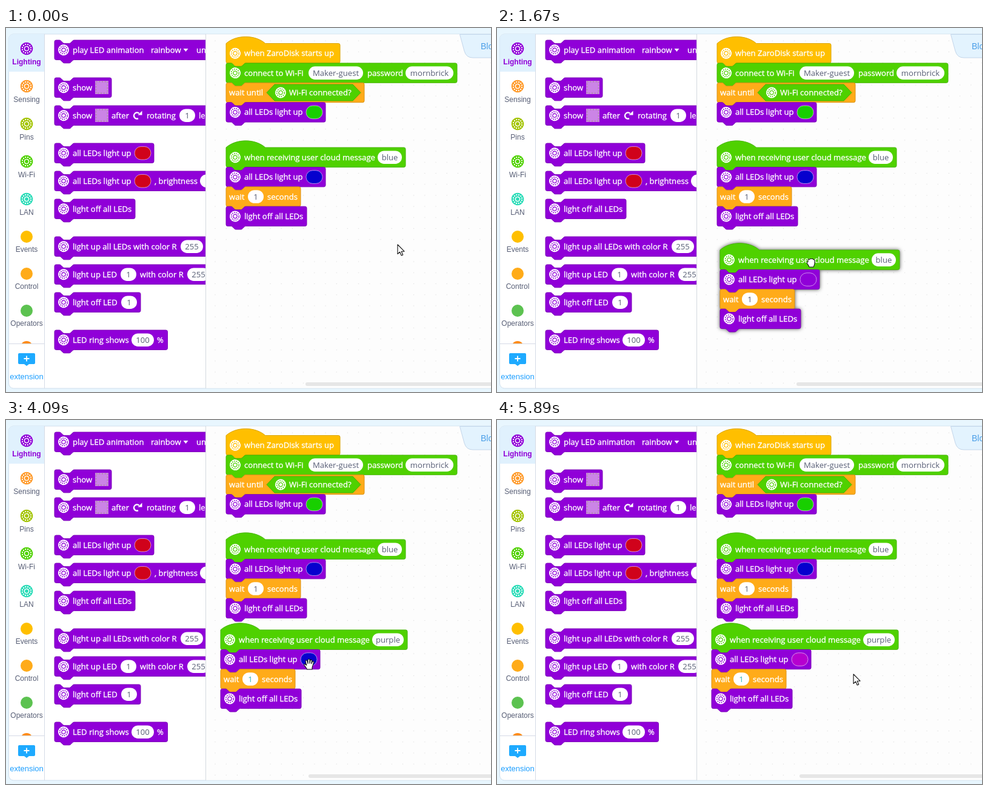
An HTML page that plays this animation: 800x600 px, repeating every 6360 ms.

```html
<!DOCTYPE html>
<html lang="en">
<head>
<meta charset="utf-8">
<title>Block editor</title>
<style>
html, body { margin: 0; width: 100%; height: 100%; overflow: hidden; background: #e8f6fe; }
svg { display: block; width: 800px; height: 600px; }
text { white-space: pre; }
.t { font: 13.1px "Open Sans", "Noto Sans", sans-serif; fill: #fff; stroke: #fff; stroke-width: .35px; }
.v { font: 13.1px "Open Sans", "Noto Sans", sans-serif; fill: #575e75; text-anchor: middle; }
.cat { font: 12px "Liberation Sans", Arial, sans-serif; fill: #575e75; text-anchor: middle; }
.on { font-weight: bold; fill: #9000d8; }
.lbl { font: bold 9.5px "Liberation Sans", Arial, sans-serif; letter-spacing: .45px; fill: #575e75; }
.num { font-weight: normal; }
.drag { filter: drop-shadow(0 0 3px rgba(0, 0, 0, .65)); }
.pop { filter: drop-shadow(0 0 4px rgba(0, 0, 0, .3)); }
</style>
</head>
<body>
<svg id="stage" viewBox="0 0 800 600"></svg>
<script>
const LOOP = 6360, SCALE = .675, ROW = 32.4, MID = 16.2;
const PURPLE = ['#9000d8', '#7a00b6'], GREEN = ['#4fd100', '#43b300'],
      GOLD = ['#ffbf00', '#d9a200'], ORANGE = ['#ffab19', '#d99116'];
const BLUE = '#0600ce', RED = '#d0021b';

// Block outline in unscaled units
function outline(width, hat) {
  const w = width / SCALE;
  const top = hat ? 'M0 0c25-22 71-22 96 0'
    : 'M0 4a4 4 0 0 1 4-4H12c2 0 3 1 4 2l4 4c1 1 2 2 4 2h12c2 0 3-1 4-2l4-4c1-1 2-2 4-2';
  return `${top}H${w - 4}a4 4 0 0 1 4 4V44a4 4 0 0 1-4 4H48c-2 0-3 1-4 2l-4 4c-1 1-2 2-4 2` +
    'h-12c-2 0-3-1-4-2l-4-4c-1-1-2-2-4-2H4a4 4 0 0 1-4-4z';
}

function halo(x, y, r, bg, fg) {
  const dot = 2 * Math.PI * r * .7 / 12;
  return `<g transform="translate(${x} ${y}) rotate(15)" fill="none" stroke="${fg}">
    <circle r="${r}" fill="${bg}" stroke="none"/>
    <circle r="${r * .7}" stroke-width="${r * .22}" stroke-linecap="round" stroke-dasharray="0 ${dot}"/>
    <circle r="${r * .35}" stroke-width="${r * .14}"/></g>`;
}

const txt = (x, s) => `<text class="t" x="${x}" y="20.8">${s}</text>`;
const icon = (c, x = 15) => halo(x, MID, 9, '#fff', c[0]);
const pill = (x, w, fill, extra = '') =>
  `<rect x="${x}" y="5.4" width="${w}" height="21.6" rx="10.8" fill="${fill}" ${extra}/>`;
const field = (x, w, s) => pill(x, w, '#fff') + `<text class="v" x="${x + w / 2}" y="20.8">${s}</text>`;
const led = (x, c, id = '') => pill(x, 27, c, `stroke="#fff" stroke-opacity=".55" ${id}`);
const matrix = x => `<rect x="${x}" y="5" width="22" height="22" fill="#cb84e6"/>
  <rect x="${x + 1.5}" y="6.5" width="19" height="19" fill="none" stroke="#b08aa8" stroke-width="2" stroke-dasharray="2 2.75"/>`;

function block(x, y, w, c, parts, hat, id = '') {
  return `<g transform="translate(${x} ${y})"><path ${id} d="${outline(w, hat)}" transform="scale(${SCALE})"
    fill="${c[0]}" stroke="${c[1]}" stroke-width="1.4"/>${parts}</g>`;
}
const ledBlock = (x, y, w, parts) => block(x, y, w, PURPLE, icon(PURPLE) + parts);

function palette() {
  const turn = `<path d="M138 21.1A5 5 0 1 1 139.5 12.9" fill="none" stroke="#fff" stroke-width="2.4"/>
    <path d="M137.5 15.5h7v-7z" fill="#fff"/>`;
  const rows = [
    [20, 330, txt(30, 'play LED animation') + txt(159, 'rainbow') + '<path d="M212.5 14h8l-4 5z" fill="#fff"/>' + txt(234, 'until done')],
    [82, 94, txt(30, 'show') + matrix(67)],
    [128, 330, txt(30, 'show') + matrix(67) + txt(94, 'after') + turn + txt(152, 'rotating') + field(206, 26, '1') + txt(238, 'leds')],
    [190, 164, txt(30, 'all LEDs light up') + led(132, RED)],
    [236, 330, txt(30, 'all LEDs light up') + led(132, RED) + txt(165, ', brightness') + field(240, 37, '')],
    [282, 133, txt(30, 'light off all LEDs')],
    [344, 330, txt(30, 'light up all LEDs with color R') + field(208, 37, '255')],
    [390, 330, txt(30, 'light up LED') + field(109, 26, '1') + txt(141, 'with color R') + field(219, 37, '255')],
    [436, 142, txt(30, 'light off LED') + field(110, 26, '1')],
    [498, 186.5, txt(30, 'LED ring shows') + field(127, 37, '100') + txt(169, '%')]
  ];
  return `<g clip-path="url(#palClip)">${rows.map(r => ledBlock(80, ...r)).join('')}</g>`;
}

function sidebar() {
  const cats = [['Lighting', '#9000d8'], ['Sensing', '#ff9a29'], ['Pins', '#a3c400'], ['Wi-Fi', '#4fd100'],
    ['LAN', '#2cdcb8'], ['Events', '#ffbf00'], ['Control', '#ffab19'], ['Operators', '#5cc250']];
  const items = cats.map(([name, c], i) => {
    const y = i < 5 ? 34 + 62 * i : 344 + 61 * (i - 5);
    return (i < 5 ? halo(34, y, 10.3, c, '#fff') : `<circle cx="34" cy="${y}" r="10" fill="${c}"/>`) +
      `<text class="cat ${i ? '' : 'on'}" x="34" y="${y + (i < 5 ? 26 : 25)}">${name}</text>`;
  }).join('');
  return `<path d="M4.5 72V18a8 8 0 0 1 8-8H63v62z" fill="#e0f1fd"/>${items}
    <path d="M26 520a10 10 0 0 1 16 0z" fill="#ff8c1a"/>
    <path d="M4 520.5H63M63.5 10V594" stroke="#d5dae6"/>
    <path d="M22 536h24a2 2 0 0 1 2 2v14a2 2 0 0 1-2 2h-8l-4 3-4-3h-8a2 2 0 0 1-2-2v-14a2 2 0 0 1 2-2z" fill="#1eaaff"/>
    <path d="M34 540.5v9M29.5 545h9" stroke="#fff" stroke-width="1.8"/>
    <text class="cat" x="34" y="579" style="font-size:13px;fill:#1e9fff">extension</text>`;
}

// Script that reacts to a cloud message; p prefixes the ids of parts that change
function message(p) {
  return block(0, 0, 296, GREEN, icon(GREEN) + txt(30, 'when receiving user cloud message') +
      pill(250, 40, '#fff', `id="${p}Box"`) + `<text class="v" id="${p}Msg" x="270" y="20.8">blue</text>`, true, `id="${p}Hat"`) +
    ledBlock(0, ROW, 164, txt(30, 'all LEDs light up') + led(132, BLUE, `id="${p}Led"`)) +
    block(0, ROW * 2, 123, ORANGE, txt(5, 'wait') + `<g id="${p}Wait">${field(36, 26, '1')}</g>` + txt(68, 'seconds')) +
    ledBlock(0, ROW * 3, 133, txt(30, 'light off all LEDs'));
}

function startup() {
  return block(363, 25.5, 188, GOLD, icon(GOLD) + txt(30, 'when ZaroDisk starts up'), true) +
    block(363, 25.5 + ROW, 381, GREEN, icon(GREEN) + txt(30, 'connect to Wi-Fi') + field(136, 90, 'Maker-guest') +
      txt(233, 'password') + field(296, 79, 'mornbrick')) +
    block(363, 25.5 + ROW * 2, 228, ORANGE, txt(5, 'wait until') +
      `<path d="M67 16.2L80 2.7H209L222 16.2 209 29.7H80z" fill="${GREEN[0]}" stroke="${GREEN[1]}"/>` +
      icon(GREEN, 90) + txt(104, 'Wi-Fi connected?')) +
    ledBlock(363, 25.5 + ROW * 3, 164, txt(30, 'all LEDs light up') + led(132, '#18cf00'));
}

function picker() {
  const slider = (name, value, y, dx, knob, id) =>
    `<text class="lbl" x="424.5" y="${y - 23}">${name}</text>
     <text class="lbl num" id="${id}Num" x="${dx}" y="${y - 23}">${value}</text>
     <rect x="424" y="${y - 11}" width="150" height="22" rx="11" fill="url(#${id})"/>
     <circle id="${id}Knob" cx="${knob}" cy="${y + .5}" r="14" fill="#fff" stroke="#dcdcde" stroke-width="3"/>`;
  return `<g id="picker">
    <path class="pop" d="M415 140.5H583a4 4 0 0 1 4 4V379.5a4 4 0 0 1-4 4H511L502 391.5q-2 1.5-4 0L489 383.5H415a4 4 0 0 1-4-4V144.5a4 4 0 0 1 4-4z" fill="#fff"/>` +
    slider('Color', 66, 187, 461, 520, 'hue') + slider('Saturation', 100, 252, 486, 561, 'sat') +
    slider('Brightness', 81, 317, 489, 538, 'val') +
    `<path d="M416 348.5H582" stroke="#dcdce0"/>
    <g fill="none" stroke="#575e75" stroke-linecap="round">
      <path d="M500 364h-8v12h15v-7" stroke-width="1.5"/><path d="M492 372h15v4h-15z" fill="#575e75"/>
      <path d="M497.5 370.5L505 363" stroke-width="2"/><path d="M502.5 360.5l5 5" stroke-width="1.8"/>
      <path d="M505.5 362.5l2.5-3" stroke-width="3.6"/>
    </g></g>`;
}

function gradient(id, stops) {
  return `<linearGradient id="${id}">${stops.map((c, i) =>
    `<stop offset="${i / (stops.length - 1)}" stop-color="${c}"/>`).join('')}</linearGradient>`;
}

document.getElementById('stage').innerHTML = `
  <defs>
    <clipPath id="palClip"><rect x="64" y="11" width="265" height="582"/></clipPath>
    <pattern id="grid" x="336" y="12" width="18.2" height="18.2" patternUnits="userSpaceOnUse">
      <circle cx="9" cy="9" r=".7" fill="#dedede"/></pattern>
    ${gradient('hue', [0, 60, 120, 180, 240, 300, 360].map(h => `hsl(${h},100%,40.5%)`))}
    ${gradient('sat', ['#cfcfcf', BLUE])}${gradient('val', ['#000', '#00f'])}
  </defs>
  <path d="M800 10H12.5a8 8 0 0 0-8 8V586a8 8 0 0 0 8 8H800" fill="#fff" stroke="#cfdeec"/>
  <path d="M330 10.5H800V593.5H330z" fill="#fdfdfd"/><path d="M330 11H800V593H330z" fill="url(#grid)"/>
  ${sidebar()}${palette()}<path d="M329.5 10V594" stroke="#d5dae0"/>
  <path d="M748.5 10.5L756 38q3 11 14 11H801V10.5z" fill="#e3f3fe" stroke="#c3d6ea"/>
  <text x="783" y="35" style="font:14px 'Liberation Sans',Arial,sans-serif;fill:#4a9fe8">Blocks</text>
  <rect id="bar" x="494" y="584" width="320" height="6" rx="3" fill="#e6e6e6"/>
  ${startup()}<g transform="translate(363 197)">${message('a')}</g><g id="copy">${message('b')}</g>${picker()}
  <g stroke="#111" stroke-width="1.1" stroke-linejoin="round" fill="#fff" id="cursor">
    <path id="arrow" d="M0 0V15.5L3.6 12.2 6.2 18 8.7 17 6.2 11.2H11z"/>
    <path id="fist" d="M-5-4.5q1-2 2.8-1Q-1-7.5.8-6.3 2.5-7.3 3.7-5.5 6-5.5 6-3V1.5Q5.5 4.5 4 7H-3Q-4 4-6 2-7.5-1-5-1.5z"/>
    <path id="hand" d="M-3.5 8Q-5.5 4-8 1.5-9-.8-7-.8L-4.3 1.2-6-5.5Q-6-7-4.8-7-3.6-7-3.3-5.8L-2-1.5V-7.5Q-1.8-9-.5-9 1-9 1-7.5V-1.8L2-6.8Q2.5-8 3.6-7.8 4.7-7.4 4.5-6.3L3.8-1.2 5.3-4.5Q6-5.6 7-5.2 8-4.6 7.6-3.4L5 5V8z"/>
  </g>`;

const $ = id => document.getElementById(id);
const el = {};
['copy', 'bBox', 'bMsg', 'bHat', 'bLed', 'bWait', 'picker', 'hueNum', 'hueKnob', 'bar',
 'cursor', 'arrow', 'fist', 'hand'].forEach(id => el[id] = $(id));
const satEnd = $('sat').lastElementChild, valEnd = $('val').lastElementChild;
const set = (e, name, v) => e.setAttribute(name, v);
const show = (e, on) => e.style.display = on ? '' : 'none';

// Screen updates come in bursts: first, last, count
const bursts = [[80, 640, 7], [840, 1380, 7], [1490, 1770, 4], [1940, 1940, 1], [2100, 2690, 8], [2780, 3330, 7],
  [3800, 4090, 4], [4270, 4850, 7], [5040, 5040, 1], [5230, 5320, 2], [5480, 5520, 2], [5710, 5890, 3]];

function held(t) {
  let at = 0;
  for (const [a, b, n] of bursts) {
    if (t < a) break;
    const step = n > 1 ? (b - a) / (n - 1) : 1;
    at = a + step * Math.min(n - 1, Math.floor((t + 10 - a) / step));
  }
  return at;
}

const path = [[0, 646, 357], [80, 668, 350], [267, 772, 300], [547, 520, 224], [640, 513, 218], [840, 513, 218],
  [1380, 533, 304.3], [1490, 510, 345], [1583, 504, 372], [1677, 518, 387], [1770, 521, 390], [1940, 518, 387],
  [2100, 504, 367], [2269, 585, 375], [2400, 585, 375], [2530, 624, 372], [3238, 640, 380], [3330, 662, 396],
  [3800, 640, 397], [3997, 486, 402], [4090, 500, 403], [4270, 503, 403], [4850, 503, 403], [5040, 558, 214],
  [5230, 558, 245], [5320, 558, 300], [5480, 566, 302], [5520, 588, 419]];

function pointer(t) {
  const i = path.findIndex(k => k[0] > t);
  if (i < 0) return path[path.length - 1].slice(1);
  const [t0, x0, y0] = path[i - 1], [t1, x1, y1] = path[i], f = (t - t0) / (t1 - t0);
  return [x0 + (x1 - x0) * f, y0 + (y1 - y0) * f];
}

const clamp = v => Math.max(0, Math.min(1, v));

function draw(time) {
  const t = held(time), [x, y] = pointer(t);
  const dragging = t > 900 && t < 2100, picked = t >= 5040;

  set(el.cursor, 'transform', `translate(${x} ${y})`);
  const arrow = t < 500 || (t > 3200 && t < 3980) || t > 5500;
  const fist = t >= 640 && t < 2100;
  show(el.arrow, arrow);
  show(el.fist, fist);
  show(el.hand, !arrow && !fist);
  show(el.cursor, t < 2600 || t > 3200);

  show(el.copy, t > 900);
  set(el.copy, 'class', dragging ? 'drag' : '');
  set(el.copy, 'transform', dragging ? `translate(${x - 150} ${y - 21})` : 'translate(354 346)');
  set(el.bar, 'x', t < 2100 ? 494 : 499);

  const n = Math.max(0, Math.min(6, Math.floor((t - 2780) / 91.6 + 1.1)));
  const w = Math.max(40, 12 + n * 6.67);
  el.bMsg.textContent = n ? 'purple'.slice(0, n) : 'blue';
  set(el.bMsg, 'x', 250 + w / 2);
  set(el.bBox, 'width', w);
  set(el.bHat, 'd', outline(256 + w, true));
  el.bWait.lastElementChild.style.fill = t >= 2100 ? '#2fb4bd' : '';

  const hue = picked ? 82 : 66;
  const color = picked ? 'hsl(293,100%,40.5%)' : BLUE;
  set(el.bLed, 'fill', t >= 1490 && t < 2100 ? PURPLE[0] : color);
  el.hueNum.textContent = hue;
  set(el.hueKnob, 'cx', 438 + hue * 1.24);
  set(satEnd, 'stop-color', color);
  set(valEnd, 'stop-color', `hsl(${hue * 3.6},100%,50%)`);

  const alpha = t < 5000 ? clamp((t - 4366) / 190) : clamp((5890 - t) / 270);
  const rise = t < 4560 ? (4560 - t) / 12 : -19 * clamp((t - 4560) / 290);
  show(el.picker, alpha > 0);
  set(el.picker, 'opacity', alpha);
  set(el.picker, 'transform', `translate(0 ${rise})`);
}

const start = performance.now();
function tick() {
  draw((performance.now() - start) % LOOP);
  requestAnimationFrame(tick);
}
tick();
</script>
</body>
</html>
```
